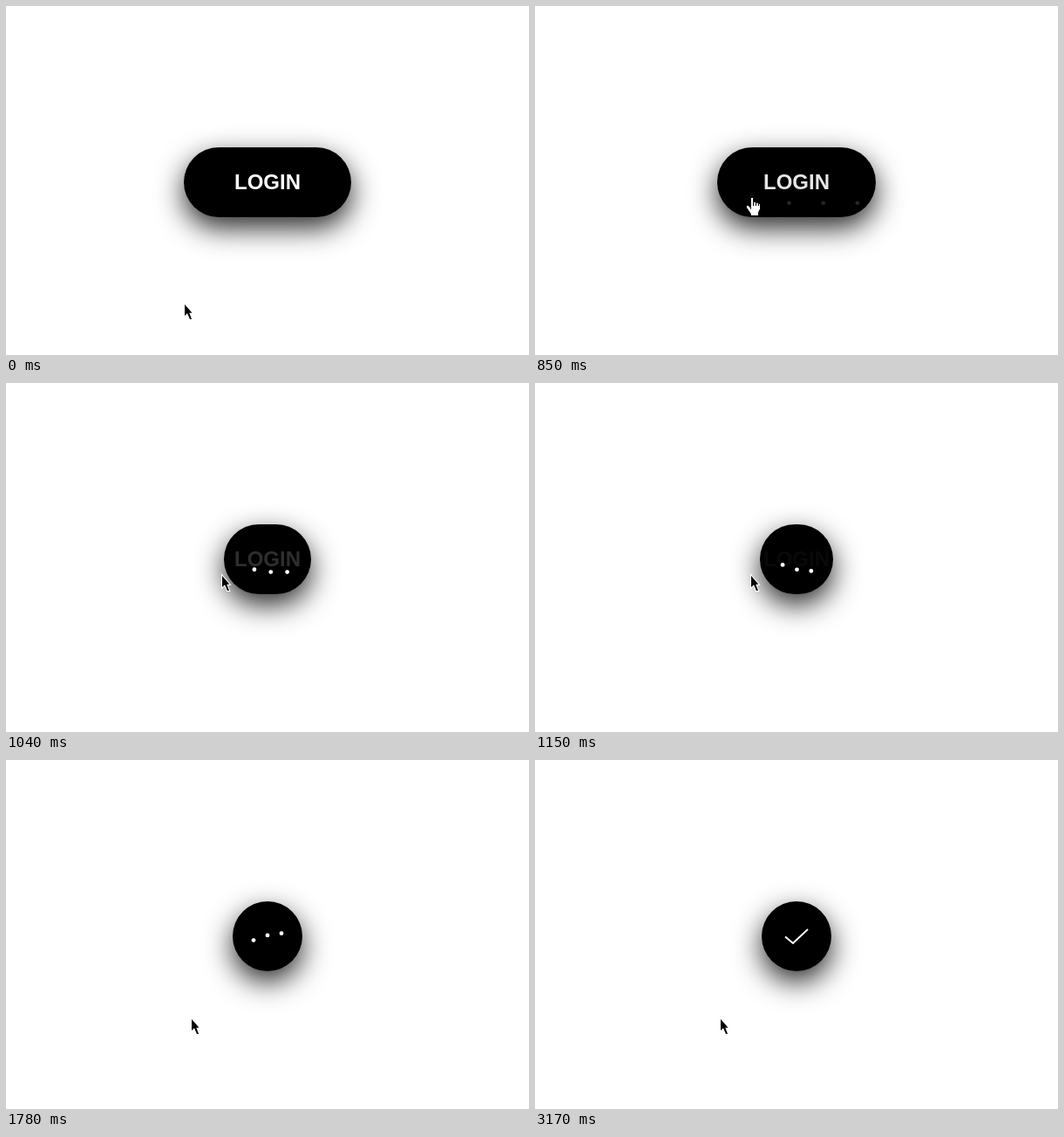
These frames come from a looping animation (600x400 px, 3510 ms). An HTML page:

```html
<!DOCTYPE html>
<html lang="en">
<head>
<meta charset="utf-8">
<title>Login button</title>
<style>
html, body { margin: 0; width: 100%; height: 100%; overflow: hidden; background: #fff; }
#stage { position: relative; width: 600px; height: 400px; overflow: hidden; }
#button {
  position: absolute; top: 162px; height: 80px; border-radius: 40px;
  background: #000; box-shadow: 0 12px 32px rgba(0, 0, 0, .85);
}
svg { position: absolute; left: 0; top: 0; }
#label { font: bold 24px "Liberation Sans", Arial, sans-serif; fill: #fff; text-anchor: middle; }
#check { fill: none; stroke: #fff; stroke-width: 2; }
#arrow { fill: #000; stroke: #fff; stroke-width: 2; paint-order: stroke; }
#hand { fill: #fff; stroke: #000; stroke-width: 1; }
</style>
</head>
<body>
<div id="stage">
  <div id="button"></div>
  <svg width="600" height="400">
    <text id="label" x="300" y="210">LOGIN</text>
    <g id="dots" fill="#fff"><circle r="2.4"/><circle r="2.4"/><circle r="2.4"/></g>
    <path id="check" pathLength="100" stroke-dasharray="100 200" d="M287 202.5 L296 210 L313 194"/>
    <path id="arrow" d="M0 0 V13 L3 10.3 L6 17 H8 L5.3 9.8 H8.5 Z"/>
    <g id="hand">
      <path d="M-.5 11.5 V-.5 L0 -1.5 H1.5 L2.5 -.5 V3.5 H4.5 L5.5 4.5 H7.5 L8.5 5.5 H9.5 L10.5 6.5 V11.5 L8.5 15.5 V19.5 H-.5 V17.5 L-5.5 10 V8.5 L-4.5 7.5 H-3.5 L-.5 10.5 Z"/>
      <path d="M2.5 3.5 V8 M5.5 4.5 V8 M8.5 5.5 V8"/>
    </g>
  </svg>
</div>
<script>
const LOOP = 3510;
const $ = id => document.getElementById(id);
const button = $('button'), label = $('label'), check = $('check');
const arrow = $('arrow'), hand = $('hand'), dots = [...$('dots').children];

const mix = (a, b, k) => a + (b - a) * k;
const part = (t, start, length) => Math.max(0, Math.min(1, (t - start) / length));
const easeOut = x => 1 - (1 - x) ** 2;
const easeInOut = x => x * x * (3 - 2 * x);

// CSS "ease": cubic-bezier(.25, .1, .25, 1), solved by bisection
function ease(x) {
  if (x === 0 || x === 1) return x;
  let lo = 0, hi = 1;
  for (let i = 0; i < 20; i++) {
    const u = (lo + hi) / 2;
    if (.75 * u * (1 - u) + u ** 3 < x) lo = u; else hi = u;
  }
  const v = 1 - lo;
  return .3 * lo * v * v + 3 * lo * lo * v + lo ** 3;
}

function drawButton(shrink) {
  const width = mix(192, 80, shrink);
  button.style.width = width + 'px';
  button.style.left = 300 - width / 2 + 'px';
  label.style.opacity = 1 - shrink;
}

// Dots slide in from the right, then bounce one after another
function drawDots(t, shrink) {
  const away = (1 - shrink) ** 1.3;
  const alpha = Math.min(1, shrink * 1.5) * (1 - ease(part(t, 2440, 300)));
  dots.forEach((dot, i) => {
    const angle = Math.max(0, t - 875 - i * 150) * 2 * Math.PI / 1222;
    dot.setAttribute('cx', 300 + 35 * away + (i - 1) * (16 + 26.5 * away));
    dot.setAttribute('cy', 207 + 8.3 * Math.cos(angle) + 12 * away);
    dot.style.opacity = alpha;
  });
}

function drawCheck(t) {
  const drawn = ease(part(t, 2620, 550));
  check.style.visibility = drawn > 0 ? 'visible' : 'hidden';
  check.style.strokeDashoffset = 100 * (1 - drawn);
}

// The pointer moves onto the button, waits, then drifts away
function drawPointer(t) {
  const come = easeOut(part(t, 420, 236));
  const go = easeInOut(part(t, 1170, 340));
  const x = Math.round(mix(mix(205, 248, come), 213, go));
  const y = Math.round(mix(mix(342, 221, come), 297, go));
  const over = t >= 560 && t < 1040;
  arrow.style.display = over ? 'none' : '';
  hand.style.display = over ? '' : 'none';
  (over ? hand : arrow).setAttribute('transform', `translate(${x} ${y})`);
}

function draw(t) {
  const shrink = ease(part(t, 805, 456));
  drawButton(shrink);
  drawDots(t, shrink);
  drawCheck(t);
  drawPointer(t);
}

const begin = performance.now();
function frame() {
  draw((performance.now() - begin) % LOOP);
  requestAnimationFrame(frame);
}
draw(0);
requestAnimationFrame(frame);
</script>
</body>
</html>
```
